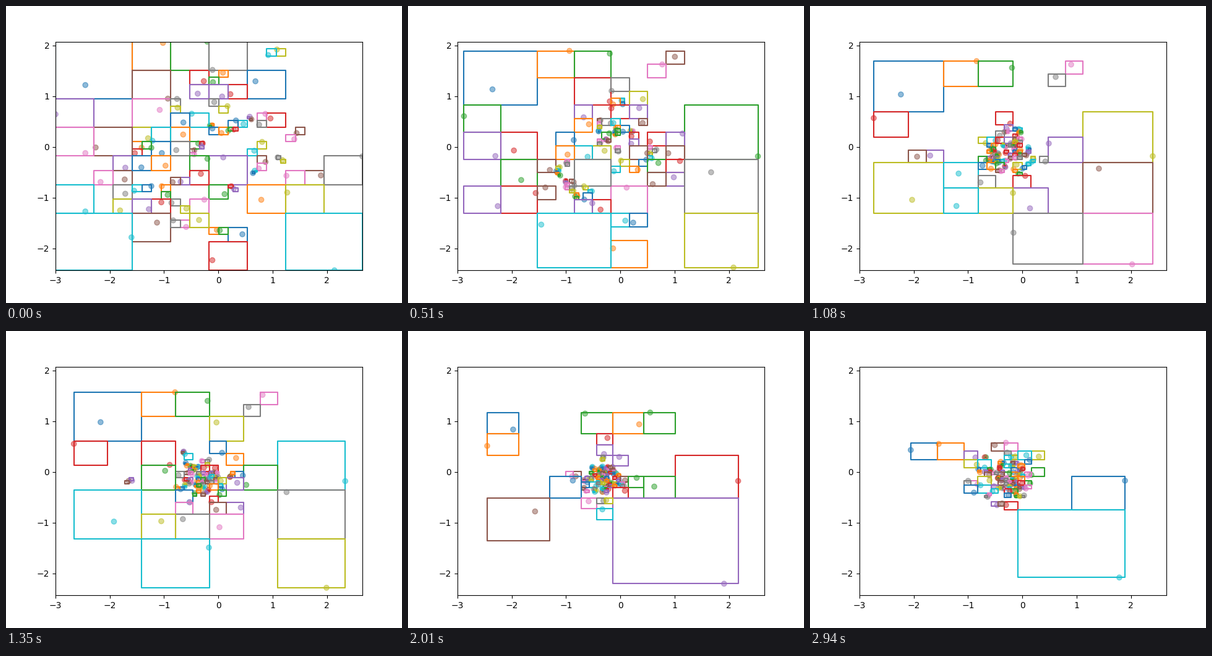
Animation of 640 by 480 pixels, one loop 2.97 s. Source, as a matplotlib script:

```python
import numpy as np
import matplotlib.pyplot as plt
from matplotlib.animation import FuncAnimation
from matplotlib.collections import PolyCollection

FRAMES, INTERVAL = 99, 30
PULL = 0.0005       # attraction per body and step
SOFT = 0.03         # softening length
MAX_DEPTH = 14
CENTER = np.array([-0.17, -0.18])

# far bodies, which set the limits and the large cells
FAR = [
    (-2.45, 1.22), (-1.02, 2.05), (-.205, 2.075), (-3, .645),
    (-2.26, -.01), (-2.45, -.12), (1.08, 1.92), (.92, 1.81),
    (2.655, -.185), (1.89, -.56), (2.14, -2.43), (-.11, -2.23),
    (-2.17, -.69), (-1.81, -1.25), (-2.45, -1.27), (-1.60, -1.78),
]
NEAR = [25, 21, 22, 16]     # bodies per quadrant, counterclockwise


def start():
    """Far bodies plus a seeded cloud that thins out from the center."""
    rng = np.random.default_rng(4)
    groups = [np.array(FAR, float)]
    for quad, n in enumerate(NEAR):
        angle = np.pi / 2 * (quad + rng.random(n))
        radius = 1.75 * rng.random(n) ** 0.7
        offset = radius * np.array([np.cos(angle), np.sin(angle)])
        groups.append(CENTER + offset.T)
    return np.vstack(groups)


def step(pos):
    gap = pos[None] - pos[:, None]
    dist2 = (gap ** 2).sum(-1) + SOFT ** 2
    return pos + PULL * (gap / dist2[..., None] ** 1.5).sum(1)


def leaves(pos, ids, x0, y0, x1, y1, depth=0):
    """Yield (body, cell) for each occupied leaf, clockwise from upper left."""
    if len(ids) == 1 or depth == MAX_DEPTH:
        for i in ids:
            yield i, [(x0, y0), (x1, y0), (x1, y1), (x0, y1)]
        return
    cx, cy = (x0 + x1) / 2, (y0 + y1) / 2
    east, north = pos[ids, 0] >= cx, pos[ids, 1] >= cy
    quads = [(~east & north, x0, cy, cx, y1), (east & north, cx, cy, x1, y1),
             (east & ~north, cx, y0, x1, cy), (~east & ~north, x0, y0, cx, cy)]
    for mask, *cell in quads:
        if mask.any():
            yield from leaves(pos, ids[mask], *cell, depth + 1)


path = [start()]
while len(path) < FRAMES:
    path.append(step(path[-1]))
count = len(path[0])
low, high = path[0].min(0), path[0].max(0)
colors = [f"C{i % 10}" for i in range(count)]

fig, ax = plt.subplots(figsize=(6.4, 4.8), dpi=100)
ax.set_xlim(low[0], high[0])
ax.set_ylim(low[1], high[1])
dots = ax.scatter(*path[0].T, c=colors, alpha=0.5)
cells = PolyCollection([], facecolors="none", edgecolors=colors,
                       linewidths=1.5, zorder=2)
ax.add_collection(cells, autolim=False)


def draw(n):
    pos = path[n]
    found = list(leaves(pos, np.arange(count), *pos.min(0), *pos.max(0)))
    dots.set_offsets(pos[[i for i, _ in found]])
    cells.set_verts([cell for _, cell in found])
    return dots, cells


anim = FuncAnimation(fig, draw, frames=FRAMES, interval=INTERVAL,
                     repeat=True, repeat_delay=0)
plt.show()
```
